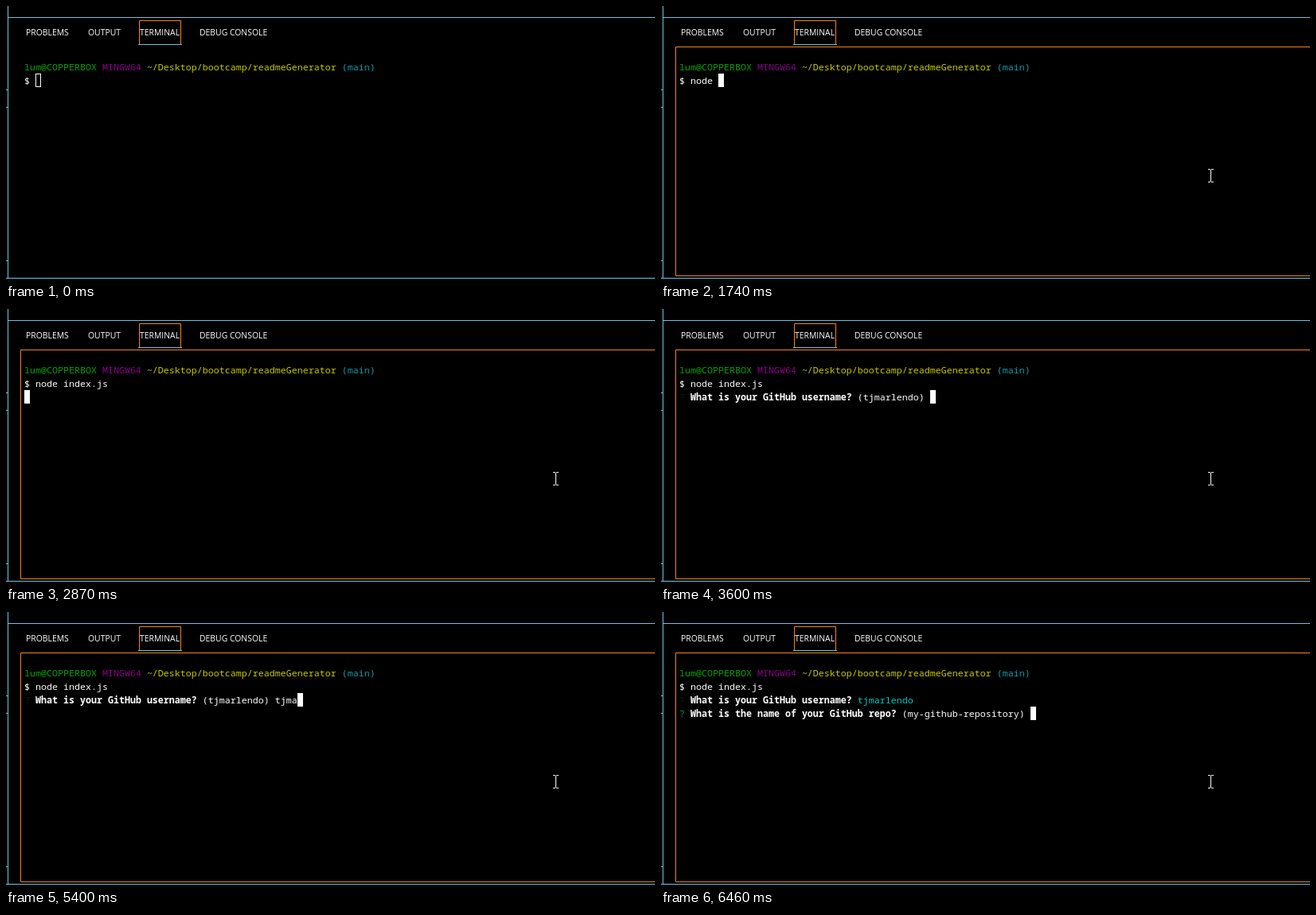
An HTML page for the animation above (8000 ms loop, 815x346 px).

```html
<!DOCTYPE html>
<html lang="en">
<head>
<meta charset="utf-8">
<title>Terminal session</title>
<style>
  html, body { margin: 0; width: 100%; height: 100%; overflow: hidden; background: #000; }
  svg { display: block; width: 815px; height: 346px; background: #000; }
  text { white-space: pre; fill: #fff; }
  .tab { font: 400 10.4px "Open Sans", "Noto Sans", sans-serif; }
  .row { font: 500 11.667px "Noto Sans Mono", "DejaVu Sans Mono", monospace; }
  .line { fill: none; stroke: #6fc3df; }
  .focus { fill: none; stroke: #f38518; }
  .green { fill: #0aa00a; }
  .dim { fill: #062606; }
  .purple { fill: #8a008a; font-weight: 400; }
  .yellow { fill: #c8c800; }
  .teal { fill: #1598a8; }
  .cyan { fill: #00c8c8; }
  .bold { font-weight: 700; }
</style>
</head>
<body>
<svg viewBox="0 0 815 346">
  <path class="line" d="M2.5 0V342M3 14.5H815M0 342.5H815M0 105.5H2M0 127.5H2M0 320.5H2"/>
  <text class="tab" x="25" y="37">PROBLEMS</text>
  <text class="tab" x="103" y="37">OUTPUT</text>
  <text class="tab" x="168" y="37">TERMINAL</text>
  <text class="tab" x="243" y="37">DEBUG CONSOLE</text>
  <path class="focus" d="M167.5 48V18.5H219.5V48"/>
  <path class="line" d="M166 48.5H221"/>
  <path class="focus" id="frame" d="M815 51.5H18.5V339.5H815"/>
  <g id="rows"></g>
  <rect id="caret" stroke="#fff"  width="6" height="16"/>
  <path id="pointer" fill="none" stroke="#fff" d="M-3 -7.5H0M1 -7.5H4M.5 -7V8M-3 8.5H0M1 8.5H4"/>
</svg>
<script>
const LOOP = 8000, LEFT = 23, TOP = 68, CELL = 7, LEAD = 17;
const FOCUS = 490, ENTER = 2870, ASK = 3600, NEXT = 6460;
const USER = "tjmarlendo";
const COMMAND = "node index.js";

// [time, number of characters typed]
const commandKeys = [
  [1420, 1], [1490, 2], [1560, 4], [1740, 5], [1860, 6], [1980, 7],
  [2160, 8], [2250, 9], [2340, 10], [2430, 11], [2550, 12], [2670, 13]
];
const answerKeys = [
  [5020, 1], [5120, 2], [5220, 3], [5400, 4], [5500, 6], [5600, 8],
  [5770, 9], [5900, 10]
];
const pointerTimes = [110, 190, 260, 340, 410];

const $ = id => document.getElementById(id);
const add = (parent, tag, attrs) => {
  const el = document.createElementNS("http://www.w3.org/2000/svg", tag);
  for (const name in attrs) el.setAttribute(name, attrs[name]);
  return parent.appendChild(el);
};

const rows = [0, 1, 2, 3].map(i =>
  add($("rows"), "text", { class: "row", x: LEFT, y: TOP + i * LEAD + 13 }));

const typed = (keys, t) => keys.reduce((n, [at, count]) => t >= at ? count : n, 0);

// Each run is [text, class].
function content(t) {
  const lines = [
    [["lum@COPPERBOX ", "green"], ["MINGW64 ", "purple"],
     ["~/Desktop/bootcamp/readmeGenerator ", "yellow"], ["(main)", "teal"]],
    [["$ " + COMMAND.slice(0, typed(commandKeys, t)), ""]]
  ];
  if (t >= ENTER && t < ASK) lines.push([]);
  if (t >= ASK) {
    const question = [["? ", "dim"], ["What is your GitHub username? ", "bold"]];
    question.push(t < NEXT
      ? [`(${USER}) ` + USER.slice(0, typed(answerKeys, t)), ""]
      : [USER, "cyan"]);
    lines.push(question);
  }
  if (t >= NEXT) {
    lines.push([["? ", "green"], ["What is the name of your GitHub repo? ", "bold"],
                ["(my-github-repository) ", ""]]);
  }
  return lines;
}

let shown = "";
function drawText(t) {
  const lines = content(t), key = JSON.stringify(lines);
  if (key === shown) return;
  shown = key;
  rows.forEach((row, i) => {
    row.textContent = "";
    for (const [text, kind] of lines[i] || []) {
      add(row, "tspan", { class: kind }).textContent = text;
    }
  });
  const last = lines.length - 1;
  const columns = lines[last].reduce((n, [text]) => n + text.length, 0);
  $("caret").setAttribute("x", LEFT + columns * CELL + 0.5);
  $("caret").setAttribute("y", TOP + last * LEAD + 0.5);
}

function drawPointer(t) {
  const step = pointerTimes.filter(at => t >= at).length;
  const rest = 1 - step / pointerTimes.length;
  const x = Math.round(690 + 180 * rest * rest), y = Math.round(213 + 40 * rest);
  $("pointer").setAttribute("transform", `translate(${x} ${y})`);
  $("pointer").style.visibility = step ? "visible" : "hidden";
}

function draw(t) {
  const focused = t >= FOCUS;
  $("frame").style.visibility = focused ? "visible" : "hidden";
  $("caret").setAttribute("fill", focused ? "#fff" : "none");
  drawText(t);
  drawPointer(t);
}

const start = performance.now();
function tick() {
  draw((performance.now() - start) % LOOP);
  requestAnimationFrame(tick);
}
tick();
</script>
</body>
</html>
```
